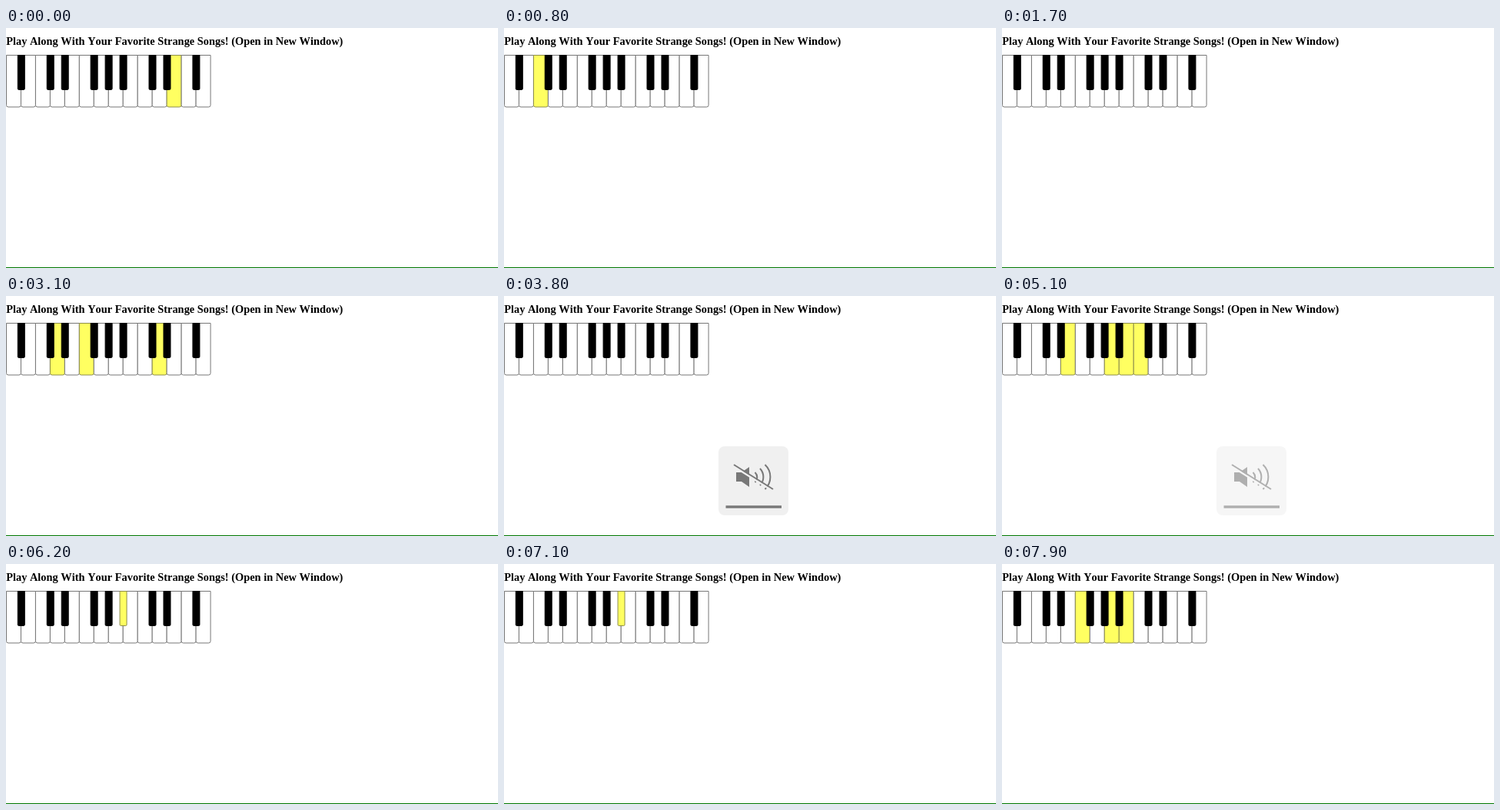
An HTML page that plays this animation: 640x313 px, repeating every 8000 ms.

```html
<!DOCTYPE html>
<html lang="en">
<head>
<meta charset="utf-8">
<title>Piano</title>
<style>
  html, body { margin: 0; width: 100%; height: 100%; overflow: hidden; background: #fff; }
  svg { display: block; width: 100%; height: 100%; }
  text { font: bold 14.4px "Liberation Serif", Times, serif; font-kerning: none; }
  .white { fill: #fff; stroke: #777; }
  .black { fill: #000; stroke: #000; }
  .on { fill: #ffff61; stroke: #8c8c4c; }
</style>
</head>
<body>
<svg viewBox="0 0 640 313">
  <text x="0.2" y="21.7">Play Along With Your Favorite Strange Songs! (Open in New Window)</text>
  <g id="keys"></g>
  <g id="volume">
    <rect x="279" y="196" width="91" height="90" rx="8" fill="#f0f0f0"/>
    <path d="M302 230h7l10-7v26l-10-7h-7z" fill="#787878"/>
    <g fill="none" stroke="#787878" stroke-width="2">
      <path d="M326.500 230a9 9 0 0 1 0 13M333 225a16 16 0 0 1 0 22M339.500 220a22 22 0 0 1 0 32"/>
      <path d="M299 222.500l51 32" stroke="#f0f0f0" stroke-width="2.500"/>
      <path d="M299 220l51 32"/>
    </g>
    <rect x="288.500" y="273.300" width="72.500" height="3.400" fill="#787878"/>
  </g>
  <rect y="312" width="640" height="1" fill="#007800"/>
</svg>
<script>
const LOOP = 8000, STEP = 100, PITCH = 18.97;
const keyBox = document.getElementById('keys');
const volume = document.getElementById('volume');

// Key with a square top and rounded bottom corners
function addKey(cls, x, w, h, r) {
  const key = document.createElementNS('http://www.w3.org/2000/svg', 'path');
  key.setAttribute('d', `M${x} 35.5h${w}v${h - r}q0 ${r} ${-r} ${r}h${2 * r - w}q${-r} 0 ${-r} ${-r}z`);
  key.setAttribute('class', cls);
  keyBox.append(key);
  return key;
}

const white = [], black = [];
for (let i = 0; i < 14; i++) white.push(addKey('white', PITCH * i + .5, PITCH, 67.5, 2.5));
// No black key after white keys 1 and 4 of each octave
for (let i = 0; i < 13; i++)
  if (i % 7 !== 1 && i % 7 !== 4) black[i] = addKey('black', PITCH * i + 15.3, 9, 45, 1.5);

function draw(now) {
  const t = Math.floor(now % LOOP / STEP) * STEP;
  const held = new Set();

  // Hold keys for a while; a roll delays each key after the one before
  function play(start, length, keys, roll = 0) {
    keys.forEach((key, i) => {
      if (t >= start + i * roll && t < start + length) held.add(key);
    });
  }

  // Sweep down to the lowest key and bounce back up
  if (t < 1000) held.add(white[Math.round(Math.abs(11 - 1.57 * t / STEP))]);

  const [, , , d, e, f, , a, b, c, highD] = white;
  play(1200, 100, [c]);
  play(1600, 100, [d]);
  play(2200, 200, [a]);
  play(3100, 100, [d, f, highD]);
  play(4200, 200, [d, f, highD]);
  play(4600, 200, [d, f], STEP);
  play(4800, 400, [e, a, b, c], STEP);
  play(6200, 200, [black[7]]);
  play(6700, 400, [black[6]]);
  play(7100, 300, [black[7]]);
  play(7400, 200, [d, f], STEP);
  play(7700, 300, [f, a, b], STEP);
  for (const key of keyBox.children) key.classList.toggle('on', held.has(key));

  const fade = Math.max(0, (t - 4550) / 950) ** 1.6;
  volume.setAttribute('opacity', t < 3800 ? 0 : Math.max(0, 1 - fade));
}

let begin;
function tick(now) {
  begin ??= now;
  draw(now - begin);
  requestAnimationFrame(tick);
}
draw(0);
requestAnimationFrame(tick);
</script>
</body>
</html>
```
